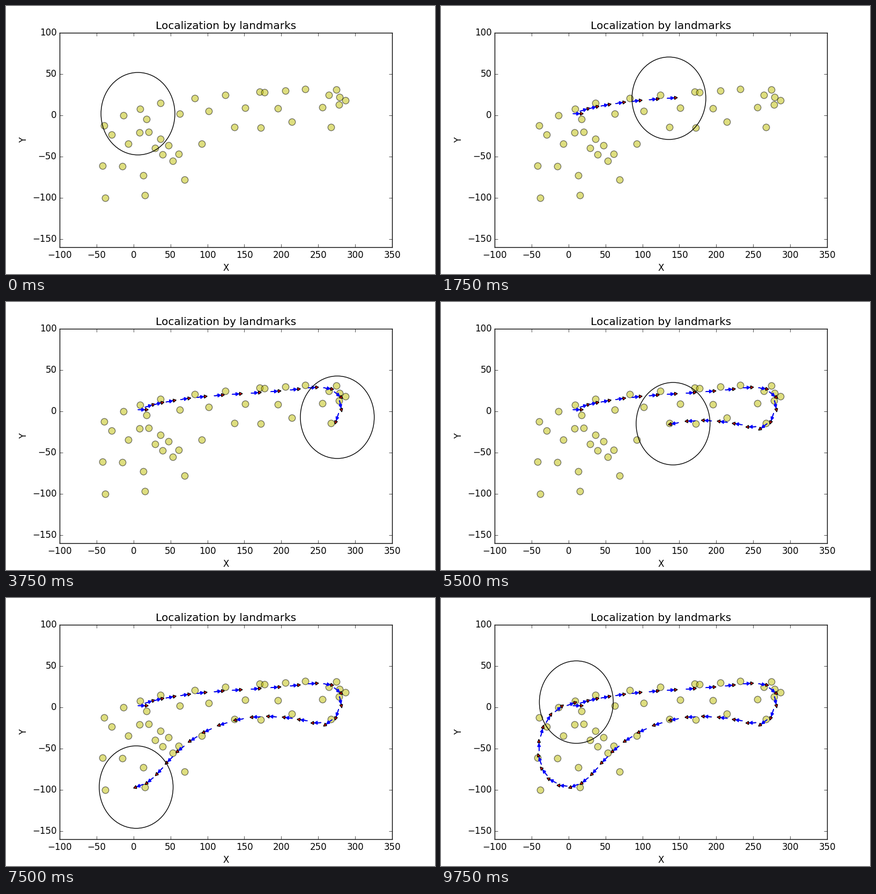
These frames come from a looping animation (800 by 500 pixels, 10000 ms). A matplotlib script:

```python
import numpy as np
import matplotlib.pyplot as plt
from matplotlib.animation import FuncAnimation
from matplotlib.patches import Circle

plt.style.use('classic')
plt.rcParams.update({'figure.dpi': 100, 'savefig.dpi': 100,
                     'font.family': 'DejaVu Sans', 'text.kerning_factor': 6})

STEPS = 40
SENSOR_RANGE = 50
DRIFT = 0.34  # how far the sensed position runs ahead, per step

# The scattered map points, from left to right.
LANDMARKS = np.array([
    (-41.9, -61.2), (-39.8, -12.5), (-38.3, -100.2), (-29.6, -23.5),
    (-15.1, -61.9), (-13.6, -0.1), (-7.1, -34.6), (8.1, -20.9), (8.9, 7.7),
    (13.2, -72.9), (15.4, -97), (17.6, -4.7), (20.5, -20.3), (29.2, -39.8),
    (36.5, 14.9), (36.5, -28.7), (39.4, -47.6), (47.3, -36.5),
    (53.1, -55.4), (61.1, -46.9), (62.6, 1.9), (69.1, -78.1), (82.9, 20.7),
    (92.3, -34.6), (101.8, 5.1), (124.3, 24.6), (136.6, -14.4), (151.1, 9),
    (170.7, 28.5), (172.2, -15.1), (177.3, 27.9), (195.4, 8.4),
    (205.6, 29.8), (214.3, -7.9), (232.4, 31.8), (255.6, 9.7),
    (264.4, 24.6), (267.3, -14.4), (274.5, 31.1), (278.1, 12.9),
    (278.9, 22), (286.9, 18.1)])

# Waypoints of the drive: step -> position in the complex plane.
WAYPOINTS = {
    0: 6 + 1.9j, 2: 27.7 + 8j, 5: 85.8 + 16.8j, 8: 159.1 + 22j,
    10: 212.1 + 25.9j, 12: 257.1 + 28.5j, 14: 278.9 + 12.9j,
    16: 268.7 - 15.1j, 18: 235.3 - 16.4j, 21: 171.5 - 11.5j,
    24: 105.4 - 26.1j, 27: 53.1 - 59.9j, 30: 13.2 - 93.4j,
    33: -28.9 - 82.7j, 36: -37.6 - 35.2j, 38: -18 - 5.3j, 40: 16 + 6j}


def spline(knots, values, t):
    """Natural cubic spline through the knots, evaluated at t."""
    def basis(u):
        cubic = np.abs(u[:, None] - knots) ** 3
        return np.column_stack([cubic, np.ones(len(u)), u])

    top = basis(knots)
    bottom = np.hstack([top[:, -2:].T, np.zeros((2, 2))])
    weights = np.linalg.solve(np.vstack([top, bottom]), np.append(values, [0, 0]))
    return basis(t) @ weights


steps = np.arange(STEPS + 1.0)
path = spline(np.array(list(WAYPOINTS), float), list(WAYPOINTS.values()), steps)
forward = np.gradient(path)
forward[0] = 1  # starts out facing along x
forward /= np.abs(forward)
centers = path + DRIFT * steps * forward

fig = plt.figure(figsize=(8, 5), dpi=100, facecolor='white')
ax = fig.add_subplot()
ax.set_title('Localization by landmarks')
ax.set_xlabel('X')
ax.set_ylabel('Y')
ax.scatter(*LANDMARKS.T, s=80, c='y', edgecolors='k', linewidths=1, alpha=0.5)


def add_arrow(pos, shaft, face, edge):
    return ax.arrow(pos.real, pos.imag, shaft.real, shaft.imag, head_width=4,
                    head_length=4, fc=face, ec=edge, visible=False)


arrows = [(add_arrow(pos, 10 * ahead, 'r', 'k'), add_arrow(pos, 5 * ahead, 'b', 'b'))
          for pos, ahead in zip(path[:STEPS], forward)]
sensor = ax.add_patch(Circle((0, 0), SENSOR_RANGE, fill=False))
ax.set_xlim(-100, 350)
ax.set_ylim(-160, 100)
ax.set_yticks(range(-150, 101, 50))


def update(step):
    sensor.center = centers[step].real, centers[step].imag
    for i, pair in enumerate(arrows):
        for arrow in pair:
            arrow.set_visible(0 < step and i <= step)
    return [sensor]


anim = FuncAnimation(fig, update, frames=STEPS, interval=250, repeat=True,
                     repeat_delay=0)
plt.show()
```
